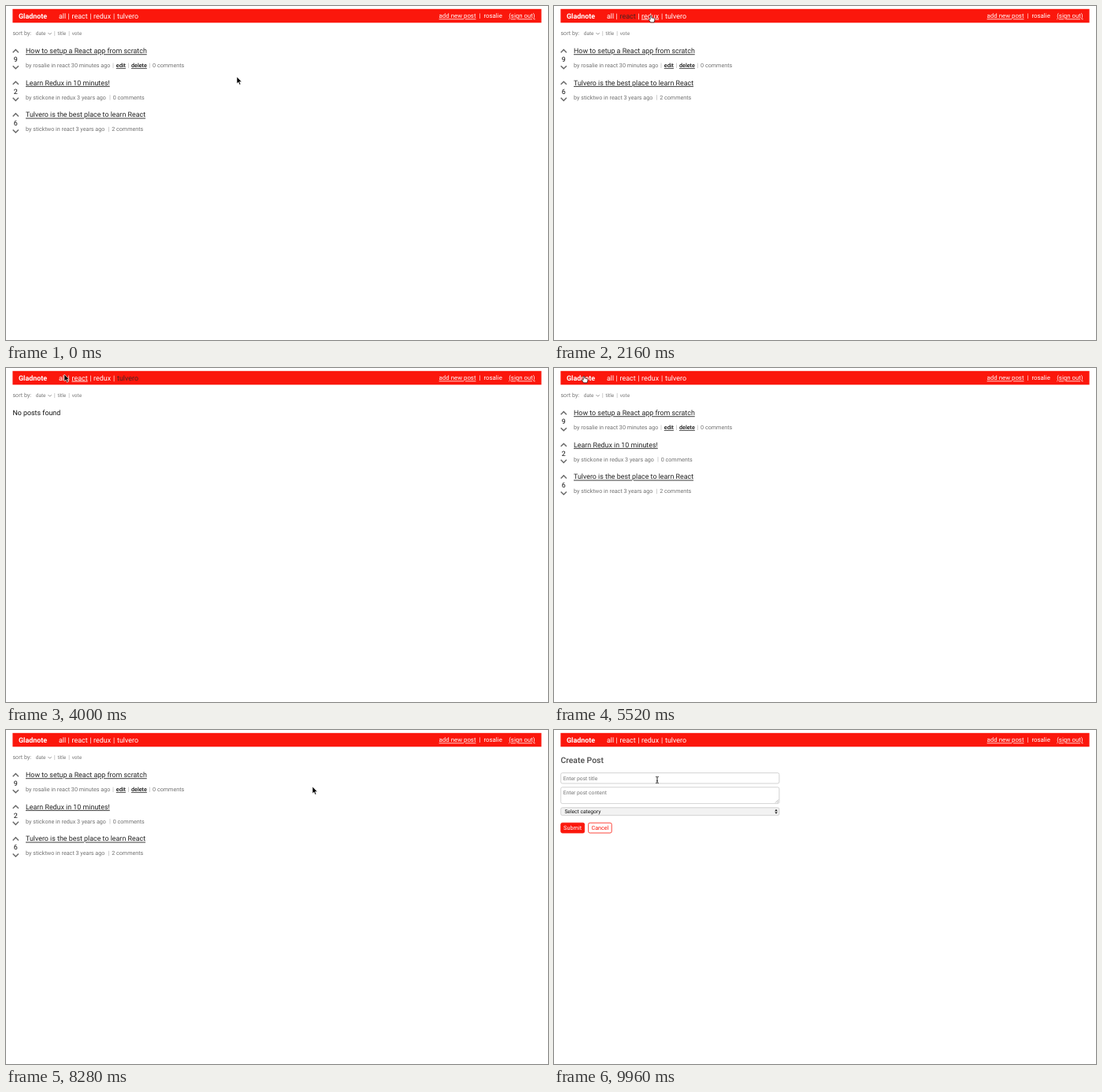
Write an HTML page that moves like this. It is 688 px wide and 425 px high and loops after 10000 ms.

```html
<!DOCTYPE html>
<html lang="en">
<head>
<meta charset="utf-8">
<title>Post board</title>
<style>
html, body { margin: 0; width: 100%; height: 100%; overflow: hidden; background: #fff; }
svg { display: block; width: 100%; height: 100%; font-family: Roboto, sans-serif; text-rendering: geometricPrecision; }
</style>
</head>
<body>
<svg viewBox="0 0 688 425">
  <g id="page"></g>
  <g id="cursor">
    <path id="arrow" d="M0 0V8.8L2 7 3.4 10.3 4.9 9.6 3.5 6.4H6.2Z" fill="#000" stroke="#fff" stroke-width=".6"/>
    <path id="hand" d="M-.9.8Q0-.6.9.8V3.2Q1.8 2.6 2.3 3.5 3.2 2.9 3.7 3.9 4.8 3.5 4.8 4.8V6.2L4 8.8H-.4L-2.7 5.6Q-2.6 4.3-.9 5.3Z" fill="#fff" stroke="#000" stroke-width=".65" stroke-linejoin="round"/>
    <path id="beam" d="M-1.8-4Q-.3-4 0-3.3 .3-4 1.8-4M0-3.3V3.3M-1.8 4Q-.3 4 0 3.3 .3 4 1.8 4M-.9 1.3H.9" fill="none" stroke="#111" stroke-width=".9"/>
  </g>
</svg>
<script>
const LOOP = 10000, RED = '#fb170c';
const $ = id => document.getElementById(id);

const text = (x, y, size, fill, str, opt = '') =>
  `<text x="${x}" y="${y}" font-size="${size}" fill="${fill}" ${opt}>${str}</text>`;
const line = (d, color, w) =>
  `<path d="${d}" fill="none" stroke="${color}" stroke-width="${w}"/>`;
const box = (x, y, w, h, fill, stroke) =>
  `<rect x="${x}" y="${y}" width="${w}" height="${h}" rx="2" fill="${fill}" stroke="${stroke}" stroke-width=".8"/>`;
const under = 'text-decoration="underline"';

const nav = [['all', 67], ['react', 83.5], ['redux', 111], ['tulvero', 141]];
const posts = [
  { title: 'How to setup a React app from scratch', votes: 9, by: 'rosalie in react 30 minutes ago', n: 0, end: 136, own: true },
  { title: 'Learn Redux in 10 minutes!', votes: 2, by: 'stickone in redux 3 years ago', n: 0, end: 132 },
  { title: 'Tulvero is the best place to learn React', votes: 6, by: 'sticktwo in react 3 years ago', n: 2, end: 130.5 }
];

// Clicks: time, selected category, posts shown
const views = [
  [0, '', [0, 1, 2]], [1320, 'react', [0, 2]], [2360, 'redux', [1]],
  [3440, 'tulvero', []], [4400, '', [0, 1, 2]], [6200, '', [2, 1, 0]],
  [7480, '', [0, 1, 2]], [9040, 'form', []]
];

// Pointer: time, x, y
const track = [
  [0, 293, 90], [500, 190, 44], [1000, 96, 12], [1500, 95, 12], [2000, 123, 12],
  [2640, 123, 12], [3160, 153, 12], [3600, 155, 13], [3920, 98, 10], [4000, 74, 8],
  [4160, 71, 12], [4640, 71, 12], [5160, 38, 10], [5560, 38, 10], [6040, 50, 34],
  [7560, 50, 34], [8240, 389, 72], [8400, 389, 72], [8880, 572, 13], [9120, 572, 13],
  [9440, 232, 14], [9760, 121, 76], [9920, 131, 63.5], [10000, 131, 63.5]
];

const links = [
  ['home', 16, 8.5, 54, 17], ['all', 67, 8.5, 76.5, 17], ['react', 83, 8.5, 104, 17],
  ['redux', 111, 8.5, 133.5, 17], ['tulvero', 141, 8.5, 170, 17],
  ['add', 549, 8.5, 597, 17], ['out', 638, 8.5, 672, 17],
  ['date', 38, 31, 59, 39], ['title', 65, 31, 77, 39], ['vote', 84, 31, 97, 39]
];
const fields = [['in', 8, 54, 286, 68], ['area', 8, 72, 286, 94]];

function pointer(t) {
  const i = Math.max(1, track.findIndex(k => k[0] > t));
  const [t0, x0, y0] = track[i - 1], [t1, x1, y1] = track[i];
  const u = (t - t0) / (t1 - t0), e = u * u * (3 - 2 * u);
  return [x0 + (x1 - x0) * e, y0 + (y1 - y0) * e];
}

const hit = (list, [x, y]) =>
  (list.find(([, l, t, r, b]) => x >= l && x <= r && y >= t && y <= b) || [''])[0];

function header(active, hover) {
  let s = `<rect x="8.4" y="3.8" width="671.2" height="17.5" fill="${RED}"/>`;
  s += text(16, 15.6, 8.95, '#fff', 'Gladnote', 'font-weight="700"');
  for (const [name, x] of nav)
    s += text(x, 15.6, 8.95, name === active ? '#4a2320' : '#fff', name, name === hover ? under : '');
  for (const x of [78.6, 106.2, 135.9]) s += text(x, 15.6, 8.95, '#fff', '|');
  s += text(549.6, 15.4, 7.85, '#fff', 'add new post', under);
  s += text(600.7, 15.4, 7.85, '#fff', '|');
  s += text(606.5, 15.4, 7.85, '#fff', 'rosalie');
  return s + text(638.2, 15.4, 7.85, '#fff', '(sign out)', under);
}

function sortBar(hover, up) {
  let s = text(8.4, 37.3, 7.2, '#777', 'sort by:');
  for (const [name, x] of [['date', 37.8], ['title', 65.4], ['vote', 83.8]])
    s += text(x, 37.2, 6.45, '#777', name, name === hover ? under : '');
  s += line(up ? 'M53.5 36.2l2.1-2.1 2.1 2.1' : 'M53.5 34.1l2.1 2.1 2.1-2.1', '#777', .8);
  return s + line('M61.7 32v6M80.2 32v6', '#bbb', .7);
}

function post(p, row) {
  const gray = '#717171', dark = '#111', y = 78.3;
  let s = line('M8.7 59.2l3.6-3.6 3.6 3.6M8.7 76.2l3.6 3.6 3.6-3.6', '#666', 1.4);
  s += text(12.3, 71.2, 8.9, dark, p.votes, 'text-anchor="middle"');
  s += text(25, 60.3, 8.88, '#222', p.title, under);
  s += text(25, y, 7.2, gray, 'by ' + p.by);
  const bars = [p.end];
  if (p.own) {
    s += text(139.8, y, 7.2, dark, 'edit', under + ' font-weight="500"');
    s += text(159, y, 7.2, dark, 'delete', under + ' font-weight="500"');
    bars.push(155.5, 182.4);
  }
  for (const x of bars) s += line(`M${x} 72.6v6.4`, '#bbb', .7);
  s += text(bars[bars.length - 1] + 3.7, y, 7.2, gray, p.n + ' comments');
  return `<g transform="translate(0 ${row * 40.6})">${s}</g>`;
}

function form() {
  return text(8.4, 41.5, 10.4, '#4a4a4a', 'Create Post', 'font-weight="500"') +
    box(8.7, 54.6, 277.2, 13.4, '#fff', '#c8c8c8') +
    text(11.7, 64, 6.75, '#757575', 'Enter post title') +
    box(8.7, 72.8, 277.2, 20.8, '#fff', '#c8c8c8') +
    text(11.7, 82.2, 6.75, '#757575', 'Enter post content') +
    line('M281 92.6l4-4M283.2 92.6l1.8-1.8', '#888', .6) +
    box(8.7, 98.8, 277.2, 9.8, '#f2f2f2', '#c8c8c8') +
    text(13.4, 106.1, 6.7, '#111', 'Select category') +
    '<path d="M280.2 103.2l1.8-2.4 1.8 2.4zM280.2 104.4l1.8 2.4 1.8-2.4z" fill="#222"/>' +
    box(8.7, 118.2, 30, 12.8, RED, RED) +
    text(23.6, 127.2, 7.3, '#fff', 'Submit', 'text-anchor="middle"') +
    box(43.6, 118.2, 29.6, 12.8, '#fff', RED) +
    text(58.4, 127.2, 7.2, RED, 'Cancel', 'text-anchor="middle"');
}

let last = '';
function draw(t) {
  const [, active, shown] = views.filter(v => v[0] <= t).pop();
  const isForm = active === 'form';
  const hover = hit(links, pointer(Math.max(0, t - 60)));
  const key = [active, shown, hover].join('/');
  if (key !== last) {
    last = key;
    $('page').innerHTML = header(active, hover) + (isForm ? form() :
      sortBar(hover, shown[0] === 2) +
      (shown.map((n, row) => post(posts[n], row)).join('') ||
        text(8.4, 60.3, 8.9, '#111', 'No posts found')));
  }
  const p = pointer(t);
  const shape = isForm && hit(fields, p) ? 'beam' : hit(links, p) ? 'hand' : 'arrow';
  for (const id of ['arrow', 'hand', 'beam'])
    $(id).style.display = id === shape ? '' : 'none';
  $('cursor').setAttribute('transform', `translate(${p[0].toFixed(2)} ${p[1].toFixed(2)})`);
}

const start = performance.now();
function tick() {
  draw((performance.now() - start) % LOOP);
  requestAnimationFrame(tick);
}
tick();
</script>
</body>
</html>
```
